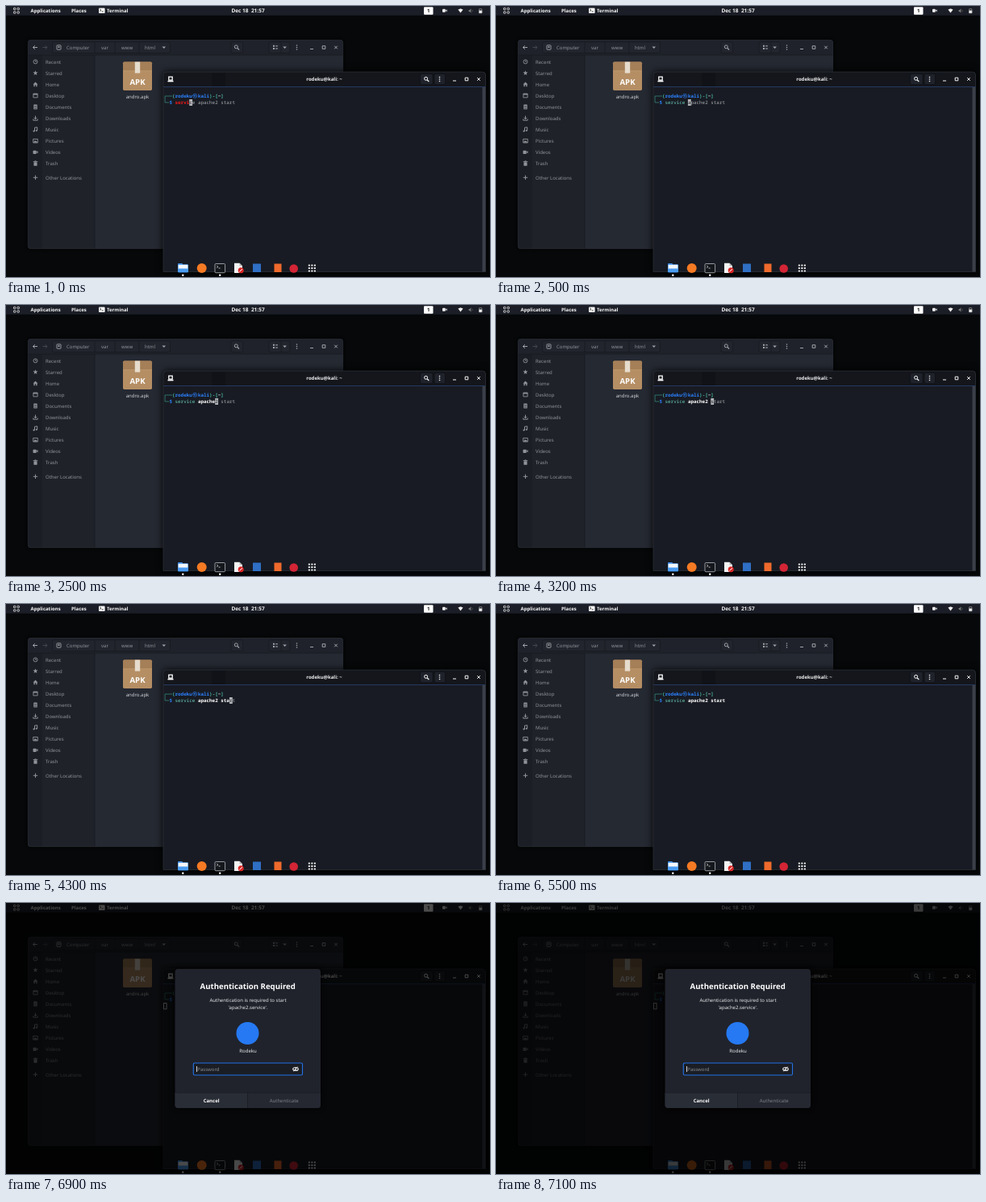
Recreate the animation shown at these times as an HTML page with a canvas. Size 600 by 337 pixels, loop 8 s.

```html
<!DOCTYPE html>
<html lang="en">
<head>
<meta charset="utf-8">
<title>Starting a service</title>
<style>
  html, body { margin: 0; width: 100%; height: 100%; overflow: hidden; background: #060809; }
  canvas { display: block; width: 600px; height: 337px; }
</style>
</head>
<body>
<canvas id="stage"></canvas>
<script>
const W = 600, H = 337, LOOP = 8000;
const canvas = document.getElementById('stage');
const g = canvas.getContext('2d');
const dpr = window.devicePixelRatio || 1;
canvas.width = W * dpr;
canvas.height = H * dpr;
g.textRendering = 'geometricPrecision';

const SANS = '"Noto Sans", "Open Sans", sans-serif';
const MONO = '"Noto Sans Mono", "DejaVu Sans Mono", "Noto Sans CJK JP", monospace';
const USER = 'rodeku';
const COMMAND = 'service apache2 start';
const CELL = 3.55, TERM_X = 195.3, COMMAND_X = TERM_X + 4 * CELL;
const ENTER = 4900, DIALOG = 6900;
const MUTED = '#909398', EDGE = '#181a20';

// [time, characters typed]
const typing = [[0, 5], [100, 6], [200, 7], [500, 8], [1400, 9], [1700, 10], [2000, 11],
  [2300, 13], [2500, 14], [2900, 15], [3200, 16], [3500, 17], [3700, 18], [4300, 19],
  [4500, 20], [4700, 21]];

function text(s, x, y, { size = 6, color = '#fff', bold = false, align = 'left', font = SANS } = {}) {
  g.font = `${bold ? 'bold ' : ''}${size}px ${font}`;
  g.fillStyle = color;
  g.textAlign = align;
  g.fillText(s, x, y);
}

function box(x, y, w, h, color, radius = 0) {
  g.fillStyle = color;
  g.beginPath();
  g.roundRect(x, y, w, h, radius);
  g.fill();
}

function frame(x, y, w, h, color, width = 1, radius = 0) {
  g.strokeStyle = color;
  g.lineWidth = width;
  g.beginPath();
  g.roundRect(x, y, w, h, radius);
  g.stroke();
}

function disc(x, y, r, color) {
  g.fillStyle = color;
  g.beginPath();
  g.arc(x, y, r, 0, 7);
  g.fill();
}

function ring(x, y, r, color, width = 0.9, from = 0, to = 7) {
  g.strokeStyle = color;
  g.lineWidth = width;
  g.beginPath();
  g.arc(x, y, r, from, to);
  g.stroke();
}

function tracePath(points) {
  g.beginPath();
  for (let i = 0; i < points.length; i += 2) g.lineTo(points[i], points[i + 1]);
}

function line(color, width, ...points) {
  tracePath(points);
  g.strokeStyle = color;
  g.lineWidth = width;
  g.stroke();
}

function poly(color, ...points) {
  tracePath(points);
  g.fillStyle = color;
  g.fill();
}

function searchIcon(x, y, color) {
  ring(x - 0.7, y - 0.7, 2, color, 1);
  line(color, 1.2, x + 0.8, y + 0.8, x + 3, y + 3);
}

function menuDots(x, y, color) {
  for (const d of [-2.5, 0, 2.5]) disc(x, y + d, 0.8, color);
}

function windowButtons(x, y, color) {
  line(color, 1, x - 2, y + 2, x + 2, y + 2);
  frame(x + 13.2, y - 1.8, 3.6, 3.6, color);
  line(color, 1, x + 28.2, y - 1.8, x + 31.8, y + 1.8);
  line(color, 1, x + 31.8, y - 1.8, x + 28.2, y + 1.8);
}

function terminalGlyph(x, y, color) {
  line(color, 0.8, x, y, x + 1.6, y + 1.3, x, y + 2.6);
  line(color, 0.8, x + 2.3, y + 3, x + 4.2, y + 3);
}

function topBar() {
  box(0, 0, W, 11.7, '#1b1e27');
  for (const x of [9.5, 14]) for (const y of [2.3, 6.8]) frame(x, y, 2.4, 2.4, '#d5d5d5', 0.9, 0.5);
  const bold = { bold: true, color: '#f4f4f4' };
  text('Applications', 30.5, 8.2, bold);
  text('Places', 81, 8.2, bold);
  box(115, 2.6, 7.6, 6.4, '#f4f4f4', 0.8);
  terminalGlyph(116.3, 3.9, '#111');
  text('Terminal', 125, 8.2, bold);
  text('Dec 18  21:57', 300, 8.3, { ...bold, size: 6.5, align: 'center' });
  box(518, 1.3, 11.5, 9.4, '#fff', 1);
  text('1', 523.7, 8.3, { bold: true, color: '#111', align: 'center' });
  box(541, 3.8, 3.8, 4, '#f0f0f0', 0.8);
  poly('#f0f0f0', 544.8, 5.8, 546.6, 4.3, 546.6, 7.3);
  poly('#f0f0f0', 560.4, 4.4, 563.5, 3.2, 566.6, 4.4, 563.5, 8.6);
  poly('#777', 573.6, 4.9, 574.8, 4.9, 576.4, 3.3, 576.4, 8.5, 574.8, 7, 573.6, 7);
  ring(576.5, 6, 1.8, '#555', 0.8, -0.9, 0.9);
  box(586.2, 5.6, 4, 3.4, '#eee', 0.4);
  frame(586.5, 3.6, 3.4, 5.2, '#aaa', 0.6, 0.4);
}

// Each icon is drawn around its own centre.
const sidebarIcons = {
  Recent() { ring(0, 0, 2.5, MUTED); line(MUTED, 0.8, 0, -1.6, 0, 0, 1.3, 0); },
  Starred() {
    const star = [];
    for (let i = 0; i < 10; i++) {
      const r = i % 2 ? 1.4 : 3.2, a = i * Math.PI / 5 - Math.PI / 2;
      star.push(r * Math.cos(a), r * Math.sin(a));
    }
    poly(MUTED, ...star);
  },
  Home() { poly(MUTED, -3, 0, 0, -3, 3, 0, 2.1, 0, 2.1, 2.8, 0.7, 2.8, 0.7, 0.8, -0.7, 0.8, -0.7, 2.8, -2.1, 2.8, -2.1, 0); },
  Desktop() { frame(-2.6, -2.4, 5.2, 4.8, MUTED, 0.9); box(-2.6, -2.4, 5.2, 1.5, MUTED); },
  Documents() { box(-2.2, -3, 4.4, 6, MUTED, 0.5); for (const y of [-1, 0.4, 1.8]) line('#1c1f26', 0.5, -1.3, y, 1.3, y); },
  Downloads() { line(MUTED, 1, 0, -3, 0, 1); line(MUTED, 1, -1.8, -0.7, 0, 1.1, 1.8, -0.7); line(MUTED, 1, -2.7, 1, -2.7, 2.6, 2.7, 2.6, 2.7, 1); },
  Music() { line(MUTED, 1, -1, 2, -1, -2.4, 2.2, -2.8, 2.2, 1.3); disc(-1.9, 2, 1.1, MUTED); disc(1.3, 1.4, 1.1, MUTED); },
  Pictures() { frame(-2.8, -2.2, 5.6, 4.6, MUTED, 0.9); poly(MUTED, -2.5, 2, -0.6, -0.6, 0.5, 0.7, 1.2, 0, 2.5, 2); },
  Videos() { box(-3, -2, 4.2, 4.2, MUTED, 0.7); poly(MUTED, 1, 0, 3, -1.8, 3, 1.9); },
  Trash() { box(-2.1, -1.5, 4.2, 4.5, MUTED, 0.6); line(MUTED, 0.9, -2.8, -2.2, 2.8, -2.2); line(MUTED, 0.9, -0.9, -3, 0.9, -3); },
  'Other Locations'() { line(MUTED, 1, -2.7, 0, 2.7, 0); line(MUTED, 1, 0, -2.7, 0, 2.7); }
};

function packageIcon() {
  box(145, 69.5, 36, 35.5, '#b58e64', 1.8);
  box(145, 69.5, 36, 11, '#a57f57', [1.8, 1.8, 0, 0]);
  line('#c29c72', 0.7, 145, 80.7, 181, 80.7);
  box(159.8, 69.5, 6.4, 14, '#e6dccd');
  text('APK', 163, 98.4, { size: 9.6, bold: true, align: 'center' });
}

function fileWindow() {
  g.save();
  g.shadowColor = '#000';
  g.shadowBlur = 4 * dpr;
  box(27, 42, 391, 260, '#252932', 4);
  g.restore();
  box(27, 42, 391, 19, '#1f222a', [4, 4, 0, 0]);
  box(27, 61, 83, 241, '#1f2229', [0, 0, 0, 4]);
  box(27, 61, 18, 241, '#1b1e25', [0, 0, 0, 4]);
  line(EDGE, 0.8, 27, 61, 418, 61);
  line(EDGE, 0.8, 110, 61, 110, 302);
  frame(27.3, 42.3, 390.4, 259.4, '#2b2e36', 0.6, 4);

  const c = '#a2a5aa';
  line(c, 1, 39, 51.5, 33.5, 51.5);
  line(c, 1, 35.8, 49.2, 33.5, 51.5, 35.8, 53.8);
  line('#44484f', 1, 45.5, 51.5, 51, 51.5);
  line('#44484f', 1, 48.7, 49.2, 51, 51.5, 48.7, 53.8);
  for (const [x, w] of [[57.5, 146], [279, 14.5], [326, 26]]) {
    box(x, 44.7, w, 13.8, '#22252d', 2);
    frame(x, 44.7, w, 13.8, EDGE, 0.8, 2);
  }
  for (const x of [110, 135, 165, 341]) line(EDGE, 0.8, x, 44.7, x, 58.5);
  frame(63, 48.8, 5, 5.4, c, 0.9, 0.6);
  disc(65.5, 51, 1.1, c);
  [['Computer', 75], ['var', 118], ['www', 143], ['html', 172]].forEach(([s, x]) => text(s, x, 53.7, { color: MUTED }));
  poly(c, 193.5, 50.6, 198, 50.6, 195.8, 53);
  searchIcon(286, 51.5, c);
  for (const y of [49.6, 52.8]) {
    box(331, y - 0.8, 2, 2, c);
    line(c, 1, 334, y + 0.2, 337, y + 0.2);
  }
  poly(c, 343.3, 50.6, 347.9, 50.6, 345.6, 53);
  menuDots(360.5, 51.5, c);
  windowButtons(379, 51.5, c);

  Object.entries(sidebarIcons).forEach(([label, icon], i) => {
    const y = 69.3 + i * 14.05 + (label === 'Other Locations' ? 3.5 : 0);
    g.save();
    g.translate(36.5, y);
    icon();
    g.restore();
    text(label, 49, y + 2.2, { color: MUTED });
  });
  packageIcon();
  text('andro.apk', 163, 115.2, { color: '#d0d2d5', align: 'center' });
}

function prompt() {
  const green = '#47b8a2', blue = '#2c82ff';
  const mono = (s, cell, color) =>
    text(s, TERM_X + cell * CELL, 114.2, { size: 5.92, font: MONO, color, bold: true });
  line('#3a9484', 0.7, 206, 112, 197.1, 112, 197.1, 120, 202.4, 120);
  mono('(', 3, green);
  mono(USER, 4, blue);
  mono('㉿', 10.1, blue);
  mono('kali', 12, blue);
  mono(')-[', 16, green);
  mono('~', 19, '#fff');
  mono(']', 20, green);
  text('$', TERM_X + 2 * CELL, 122.2, { size: 5.92, font: MONO, color: blue, bold: true });
}

function commandLine(t) {
  const typed = typing.findLast(([at]) => at <= t)[1];
  const put = (s, from, color, bold) =>
    text(s, COMMAND_X + from * CELL, 122.2, { size: 5.92, font: MONO, color, bold });
  const known = typed >= 7;
  put(COMMAND.slice(0, Math.min(typed, 7)), 0, known ? '#6ccfbc' : '#f01818', !known);
  if (typed > 8) put(COMMAND.slice(8, typed), 8, '#fff', true);
  put(COMMAND.slice(typed), typed, '#a6a9ae', false);
  if (t < ENTER && !(t >= 1100 && t < 1400)) {
    box(COMMAND_X + typed * CELL, 116, CELL + 0.3, 8, '#b4b6ba');
    put(COMMAND.slice(typed, typed + 1), typed, '#22252c', false);
  }
  if (t >= DIALOG) frame(195.5, 124.5, 3.6, 7.4, '#fff', 0.8);
  else if (t >= ENTER && Math.floor((t - ENTER) / 600) % 2 === 0) box(195.3, 124.2, CELL + 0.3, 8, '#fff');
}

function terminalWindow(t) {
  g.save();
  g.shadowColor = '#000';
  g.shadowBlur = 10 * dpr;
  box(195, 82, 399.5, 248.5, '#181b23', [4, 4, 0, 0]);
  g.restore();
  box(195, 82, 399.5, 18, '#14161c', [4, 4, 0, 0]);
  box(255, 83, 17, 17, '#101217');
  box(195, 100, 399.5, 1, '#26395f');
  box(590.5, 101, 4, 229.5, '#3a3f49');
  frame(195, 82, 399.5, 248.5, '#30343c', 0.7, [4, 4, 0, 0]);
  frame(201.8, 88.2, 4.4, 4, '#fff', 1.3);
  line('#fff', 1.5, 200.5, 93.6, 207.5, 93.6);
  text(`${USER}@kali: ~`, 394.5, 93.2, { bold: true, align: 'center', color: '#f0f0f0' });
  for (const [x, w] of [[513.5, 15.5], [531, 13.5]]) {
    box(x, 84.3, w, 13.4, '#1f222a', 2);
    frame(x, 84.3, w, 13.4, '#0d0f13', 0.7, 2);
  }
  searchIcon(521.3, 91, '#fff');
  menuDots(537.5, 91, '#fff');
  windowButtons(556, 91, '#f4f4f4');
  prompt();
  commandLine(t);
}

function dock() {
  box(213, 320, 6, 4, '#3d8ee8', 1);
  box(213, 321.3, 13, 10, '#3586e4', 1);
  box(213.6, 321.8, 11.8, 6, '#f4f7fb', 0.7);
  box(213, 326.5, 13, 4.8, '#4a9cf2', 1);
  disc(242.7, 326, 6, '#f57a24');
  box(259, 320.5, 12.6, 11.2, '#14171c', 1.2);
  frame(259, 320.5, 12.6, 11.2, '#b9bcc0', 0.8, 1.2);
  terminalGlyph(261.3, 323, '#eee');
  poly('#f3f3f3', 283, 319.8, 289.5, 319.8, 293, 323.2, 293, 332, 283, 332);
  poly('#bbb', 289.5, 319.8, 293, 323.2, 289.5, 323.2);
  disc(291.2, 328.8, 3.5, '#d92626');
  line('#fff', 1, 289.4, 330.4, 293, 327.2);
  box(306, 320.5, 10, 10.5, '#2f6fc4');
  box(332.5, 320.5, 9, 10.5, '#ef6a2c');
  disc(356.7, 326.5, 5.3, '#d32535');
  for (let i = 0; i < 9; i++) box(374.8 + (i % 3) * 3.5, 321.5 + Math.floor(i / 3) * 3.5, 2.1, 2.1, '#f2f2f2', 0.5);
  for (const x of [219.3, 265.2]) disc(x, 334.7, 1.2, '#fff');
}

function dialog() {
  const center = { align: 'center', color: '#e6e7e9' };
  g.save();
  g.shadowColor = '#000';
  g.shadowBlur = 6 * dpr;
  box(209.5, 82, 180.5, 173, '#20232c', 4);
  g.restore();
  box(209.5, 236, 90, 19, '#292d36', [0, 0, 0, 4]);
  box(299.5, 236, 90.5, 19, '#252831', [0, 0, 4, 0]);
  line('#1a1d24', 0.8, 209.5, 236, 390, 236);
  line('#1a1d24', 0.8, 299.5, 236, 299.5, 255);
  text('Authentication Required', 299.7, 106.6, { ...center, size: 9.6, bold: true, color: '#fff' });
  text('Authentication is required to start', 300, 123.3, center);
  text("'apache2.service'.", 300, 131.8, center);
  disc(299.5, 162, 14, '#2679f2');
  text(USER[0].toUpperCase() + USER.slice(1), 300, 186, center);
  box(232, 198.8, 135.8, 15.4, '#1a1d24', 1.5);
  frame(232.3, 199, 135.2, 15, '#2372e6', 1.1, 1.5);
  line('#fff', 0.8, 236.5, 203, 236.5, 210);
  text('Password', 237.3, 208.7, { color: '#8b8e94' });
  g.strokeStyle = '#eee';
  g.lineWidth = 1.1;
  g.beginPath();
  g.ellipse(359, 206.5, 3.3, 2, 0, 0, 7);
  g.stroke();
  disc(359, 206.5, 1.1, '#eee');
  line('#eee', 1, 356.6, 209.3, 361.6, 203.6);
  text('Cancel', 254.6, 247.7, { ...center, bold: true, color: '#fff' });
  text('Authenticate', 344.7, 247.7, { ...center, color: '#7c8088' });
}

function draw(t) {
  g.setTransform(dpr, 0, 0, dpr, 0, 0);
  box(0, 0, W, H, '#060809');
  fileWindow();
  terminalWindow(t);
  topBar();
  dock();
  if (t >= DIALOG) {
    const dim = t < 7000 ? 0.7 : t < 7100 ? 0.74 : 0.77;
    box(0, 0, W, H, `rgba(0, 0, 0, ${dim})`);
    dialog();
  }
}

function tick() {
  draw(performance.now() % LOOP);
  requestAnimationFrame(tick);
}
tick();
</script>
</body>
</html>
```
